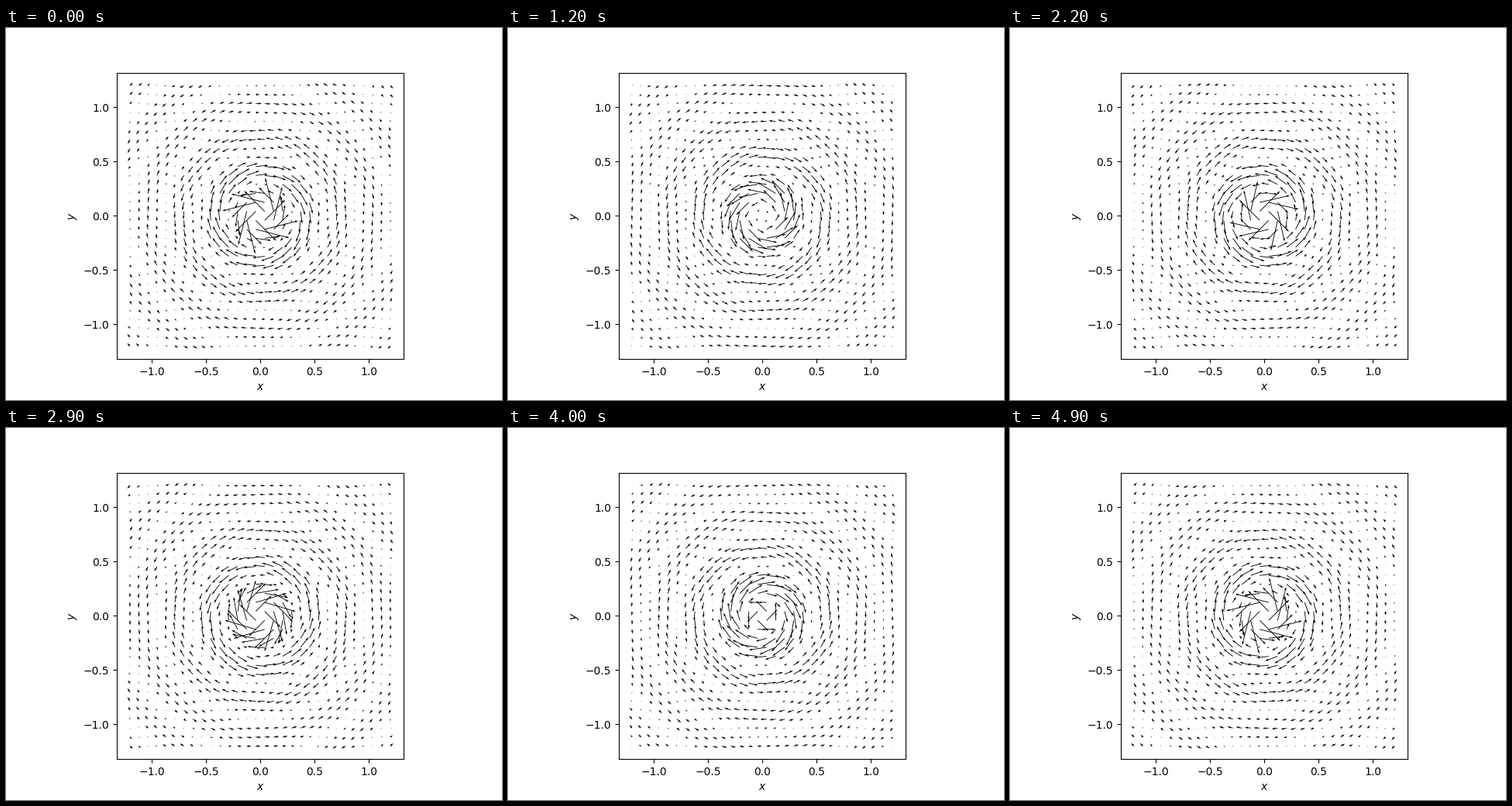
A matplotlib script that plays this animation: 640x480 px, repeating every 5000 ms.

```python
import numpy as np
import matplotlib.pyplot as plt
from matplotlib.animation import FuncAnimation

FRAMES = 50
GRID = 30
WAVELENGTH = 0.6
CORE = 0.09  # softens the potential at the centre

axis = np.linspace(-1.2, 1.2, GRID)
x, y = np.meshgrid(axis, axis)
r = np.hypot(x, y)


def field(frame):
    """Curl of an outgoing wave potential; the last frame closes the cycle."""
    phase = 2 * np.pi * frame / (FRAMES - 1)
    potential = np.cos(2 * np.pi * r / WAVELENGTH - phase) / (r + CORE)
    d_dy, d_dx = np.gradient(potential, axis, axis)
    return d_dy, -d_dx


fig, ax = plt.subplots(figsize=(6.4, 4.8), dpi=100)
u, v = field(0)
arrows = ax.quiver(x, y, u, v, scale=1.8 * GRID * np.hypot(u, v).mean())
ax.set_xlim(-1.32, 1.32)
ax.set_ylim(-1.32, 1.32)
ax.set_aspect("equal")
ax.set_xlabel("$x$")
ax.set_ylabel("$y$")


def update(frame):
    arrows.set_UVC(*field(frame))
    return (arrows,)


anim = FuncAnimation(fig, update, frames=FRAMES, interval=100, repeat=True)
plt.show()
```
